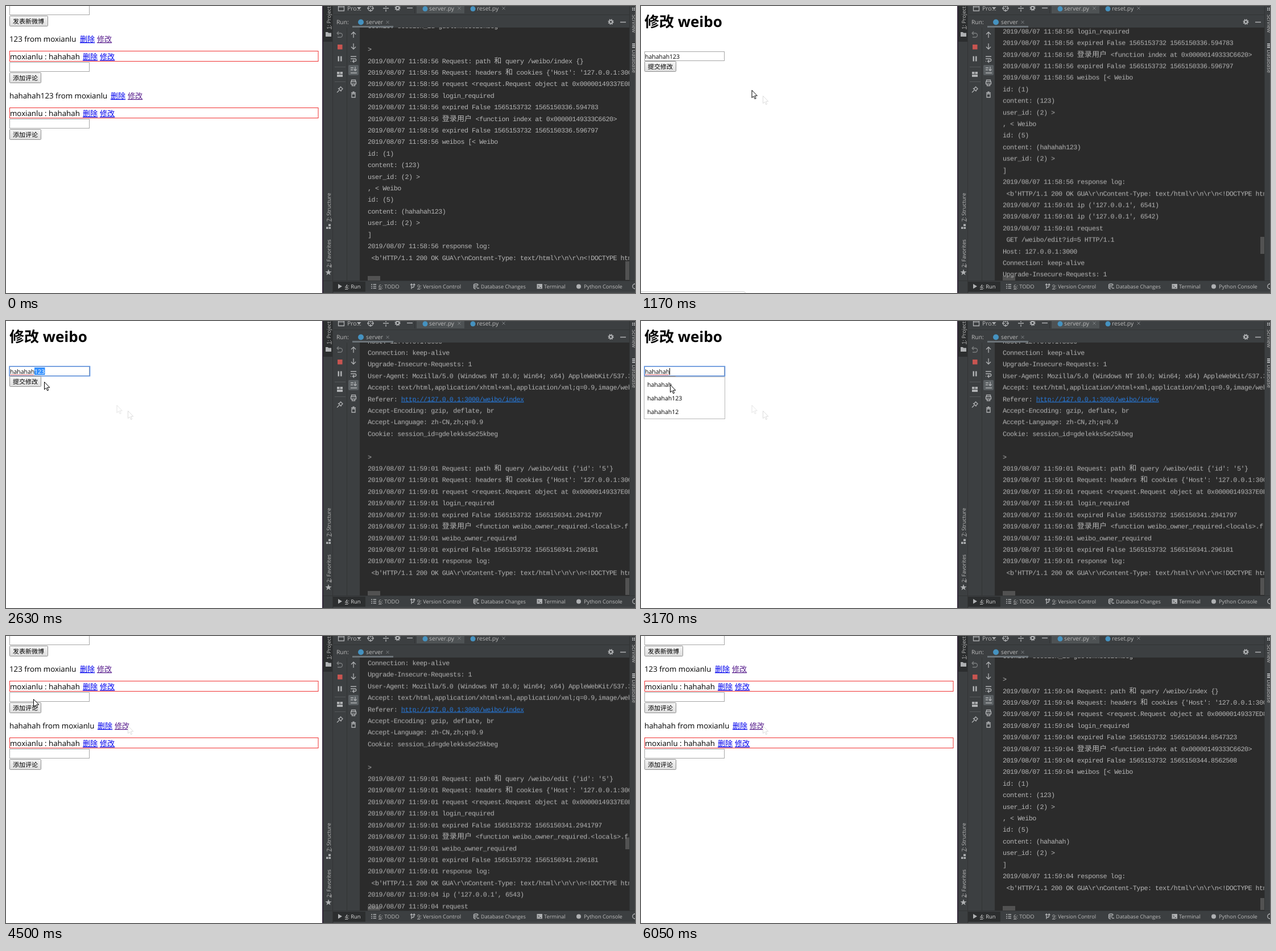
An HTML page for the animation above (6360 ms loop, 1106x506 px).

```html
<!DOCTYPE html>
<html lang="zh">
<head>
<meta charset="utf-8">
<title>修改 weibo</title>
<style>
html, body { margin: 0; width: 100%; height: 100%; overflow: hidden; background: #fff; }
svg { display: block; width: 1106px; height: 506px; }
text { white-space: pre; text-rendering: geometricPrecision; font-family: "Open Sans", "Noto Sans CJK SC", "Noto Sans CJK", sans-serif; }
.page text { font-size: 13.3px; }
.page .link { font-size: 13.1px; fill: #00e; text-decoration: underline; }
.page .seen { fill: #551a8b; }
.page .small { font-size: 10.5px; }
.page .label { font-size: 11px; }
.page .title { font-size: 26px; font-weight: 700; }
.field { fill: #fff; stroke: #a6a6a6; }
.button { fill: url(#face); stroke: #8e8e8e; }
.bar text { font-size: 9.3px; fill: #bbb; }
.bar .tab { font-size: 10.3px; }
.bar .key { text-decoration: underline; }
.icon { fill: none; stroke: #afb1b3; stroke-width: 1.3; }
.solid { fill: #afb1b3; }
.log text { font-family: "Liberation Mono", "Noto Sans CJK SC", "Noto Sans CJK", monospace; font-size: 11.7px; letter-spacing: -.476px; fill: #b6b6b6; }
.log .wide { font-size: 13.09px; letter-spacing: 0; }
.log .url { fill: #287bde; text-decoration: underline; }
.thumb { fill: #a6a6a6; fill-opacity: .32; }
</style>
</head>
<body>
<svg viewBox="0 0 1106 506">
  <defs>
    <linearGradient id="face" x2="0" y2="1"><stop stop-color="#f5f5f5"/><stop offset="1" stop-color="#dedede"/></linearGradient>
    <clipPath id="pane"><path d="M622 38H1096V484H622Z"/></clipPath>
    <path id="arrow" d="M.5 .5V13.8L3.5 11 5.7 15.8 7.7 14.9 5.6 10.2H9.8Z"/>
    <g id="gear" fill="none" stroke="#afb1b3"><circle r="2.8" stroke-width="2"/><circle r="4.3" stroke-width="1.6" stroke-dasharray="1.7 1.68"/></g>
    <path id="close" d="M-2.5 -2.5 2.5 2.5M2.5 -2.5 -2.5 2.5" stroke="#7d8184" fill="none"/>
  </defs>
  <rect width="1106" height="506" fill="#fff"/>

  <g class="page" id="list">
    <g id="forms"></g>
    <g id="before"><text x="6" y="163">hahahah123 from moxianlu</text></g>
    <g id="after"><text x="6" y="163">hahahah from moxianlu</text></g>
  </g>

  <g class="page" id="edit">
    <rect width="556" height="506" fill="#fff"/>
    <text class="title" x="6" y="36.5">修改 weibo</text>
    <rect class="field" x="6.5" y="80.5" width="140" height="16"/>
    <rect id="filled" x="6" y="80" width="141" height="17" fill="#e8f0fe"/>
    <rect id="focus" x="6" y="80" width="141.5" height="17" fill="none" stroke="#5b92e5" stroke-width="1.5"/>
    <text class="small" x="7" y="92.7">hahahah</text>
    <path id="wave" fill="none" stroke="#f33" stroke-width=".9"/>
    <text class="small" id="digits" x="50" y="92.7">123</text>
    <g id="picked">
      <rect x="50" y="82" width="18.5" height="13" fill="#3390ff"/>
      <text class="small" x="50" y="92.7" fill="#fff">123</text>
    </g>
    <path id="caret" d="M50.5 83V95" stroke="#000"/>
    <g id="submit"></g>
    <rect id="pressed" x="6.5" y="97.5" width="55" height="18" fill="#000" fill-opacity=".12" stroke="#666"/>
    <g id="hints">
      <rect x="5.5" y="98.5" width="142" height="74" fill="#fff" stroke="#b8b8b8"/>
      <rect id="hover" x="6" y="100" width="141" height="24" fill="#e8e8e8"/>
      <text class="small" x="11" y="115.5">hahahah</text>
      <text class="small" x="11" y="139.5">hahahah123</text>
      <text class="small" x="11" y="163.5">hahahah12</text>
    </g>
    <path id="bubble" d="M0 503.5H180Q183.5 503.5 183.5 506" fill="none" stroke="#d4d4d4"/>
  </g>

  <use href="#arrow" id="trailA" x="214" y="158" fill="#fff" stroke="#dcdcdc"/>
  <use href="#arrow" id="trailB" x="194.5" y="148" fill="#fff" stroke="#e4e4e4"/>

  <g class="bar">
    <rect x="556" width="550" height="506" fill="#3c3f41"/>
    <path d="M556 0H558V506H556Z" fill="#33283a"/>
    <path d="M558 0H574V63H558ZM575 486H632V504H575Z" fill="#2c2e2f"/>
    <path d="M574.5 0V506M576 15.5H1096M1096.5 0V485M558 484.5H1106M718.5 0V13M599.5 38V484" stroke="#323435" fill="none"/>
    <rect x="722" width="84" height="13" fill="#4e5254"/>
    <rect x="622" y="38" width="474" height="446" fill="#2b2b2b"/>
    <rect x="609" y="35" width="72" height="3" fill="#6c7378"/>
    <rect x="602" y="104" width="18" height="18" rx="2" fill="#5a5f62"/>
    <path d="M576 504.5H1106" stroke="#4b4e50"/>

    <text class="tab" x="600" y="7.5">Pro...</text>
    <path class="solid" d="M617 2H624.5L620.7 6.5Z"/>
    <text class="tab" x="744" y="7.5">server.py</text>
    <text class="tab" x="828" y="7.5">reset.py</text>
    <text class="tab" x="581" y="32">Run:</text>
    <text class="tab" x="633" y="32">server</text>
    <g fill="#4592c0"><circle cx="737" cy="5" r="4.5"/><circle cx="821" cy="5" r="4.5"/><circle cx="624" cy="28.500" r="5"/></g>
    <use href="#close" x="797" y="4"/><use href="#close" x="875" y="4"/><use href="#close" x="671" y="28.500"/>
    <use href="#gear" x="688.5" y="3.500"/><use href="#gear" x="1063.5" y="28"/>

    <path class="icon" d="M584.500 0V8.500H594.500V0M584 1.500H595" stroke="#8cb4cc"/>
    <path class="icon" d="M636.500 4a4.500 4.500 0 1 0 9 0a4.500 4.500 0 1 0-9 0M641 -1V2.500M641 5.500V10M635 4H639.500M642.500 4H647M663 4H673M668 -1V2M668 6V10M705 3.500H715M1080 28.500H1090"/>
    <path class="icon" d="M583 48H588A3.500 3.500 0 0 1 588 55H583M585 45 582 48 585 51" stroke-opacity=".55"/>
    <rect x="583" y="68" width="8.500" height="8.500" fill="#c75450"/>
    <path class="solid" d="M583.500 88.500h2.500v9h-2.500zM588 88.500h2.500v9h-2.500zM582 116h4.500v4h-4.500zM587.500 116h4.500v4h-4.500zM582 121h10v4h-10z"/>
    <path d="M578 107.500H597M578 133.500H597" stroke="#55585a"/>
    <path class="icon" d="M582 152.500 586 148.500M584 145 589.500 150.500M585.500 146 588.500 142.500 592 146 588.500 149.500" stroke-width="1.6"/>
    <path class="icon" d="M611 56V46M607 50 611 46 615 50M611 66V76M607 72 611 76 615 72M606 89H616M606 93H613.500A2.200 2.200 0 0 1 613.500 97.500H610M612 95 609.500 97.500 612 100M606 97.500H607M606 109H611M606 112.500H610M614 107V114M611.500 111.500 614 114 616.500 111.500M606 118H617"/>
    <path class="icon" d="M607.500 133V130.500H614.500V133M606.500 133.500H615.500V137.500H606.500ZM608.500 137V140.500H613.500V137M607 153H615M609.500 151.500H612.500M608 155V161H614V155Z" stroke-width="1.6"/>

    <text transform="translate(570.500 41)rotate(-90)"><tspan class="key">1</tspan>: Project</text>
    <text transform="translate(570.500 380)rotate(-90)"><tspan class="key">7</tspan>: Structure</text>
    <text transform="translate(570.500 461)rotate(-90)"><tspan class="key">2</tspan>: Favorites</text>
    <text transform="translate(1100.500 15)rotate(90)">SciView</text>
    <text transform="translate(1100.500 77)rotate(90)">Database</text>
    <path class="solid" d="M562 46H566L567 47.500H572V54H562ZM567 384.500h4v3.500h-4zM563 389.500h3.500v3.500h-3.500zM567.500 389.500h3.500v3.500h-3.500zM567 464 568.500 468H572.500L569.300 470.500 570.500 474.500 567 472 563.500 474.500 564.700 470.500 561.500 468H565.500ZM1101 3h2v2h-2zM1104 3h2v2h-2zM1101 6h2v2h-2zM1104 6h2v2h-2zM1101 66h5v2h-5zM1101 69h5v2h-5zM1101 72h5v2h-5z"/>

    <path class="solid" d="M584 490 591 494.300 584 498.500ZM933.500 490h9.500v8.500h-9.500z"/>
    <path class="icon" d="M642 491H644M645.500 491H651M642 494.300H644M645.500 494.300H651M642 497.500H644M645.500 497.500H651M713 490V499M713 496H715.500Q717.500 496 717.500 493V491M711 492 713 490 715 492M716 492 717.500 490 719.500 492M822.500 491.500a3.700 1.500 0 1 0 7.400 0a3.700 1.500 0 1 0-7.400 0V497Q824 499 826 498.500M822.500 494.500Q825 496.500 829 495M828 497.500H832M1106 490a4 4 0 0 0 0 8.500"/>
    <path d="M935.500 492 937.500 494 935.500 496M938.500 496.500H941" stroke="#3c3f41" fill="none"/>
    <circle class="solid" cx="1007" cy="494.500" r="4"/>
    <text x="596" y="497.800" style="fill:#ddd"><tspan class="key">4</tspan>: Run</text>
    <text x="655" y="497.800"><tspan class="key">6</tspan>: TODO</text>
    <text x="723" y="497.800"><tspan class="key">9</tspan>: Version Control</text>
    <text x="835" y="497.800" style="font-size:9.1px">Database Changes</text>
    <text x="946" y="497.800">Terminal</text>
    <text x="1016" y="497.800">Python Console</text>
  </g>

  <g class="log" clip-path="url(#pane)">
    <g id="scroll"></g>
    <g id="tail"></g>
    <rect class="thumb" x="636" y="476" width="22" height="8"/>
    <rect class="thumb" id="thumb" x="1089" width="7"/>
  </g>

  <path id="beam" d="M-3 -7H-1L0 -6 1 -7H3M0 -6V6M-3 7H-1L0 6 1 7H3" fill="none" stroke="#000"/>
  <use href="#arrow" id="cursor" fill="#fff" stroke="#000"/>
</svg>
<script>
const LOOP = 6360;
const $ = id => document.getElementById(id);

function add(parent, tag, attrs, text) {
  const node = document.createElementNS('http://www.w3.org/2000/svg', tag);
  for (const key in attrs) node.setAttribute(key, attrs[key]);
  if (text !== undefined) node.textContent = text;
  return parent.appendChild(node);
}

// Each state [time, styles] holds until the next one.
function hold(node, states) {
  const frames = states.map(([t, style]) => ({ ...style, offset: t / LOOP, easing: 'step-end' }));
  frames.push({ ...states[states.length - 1][1], offset: 1 });
  node.animate(frames, { duration: LOOP, iterations: Infinity });
}

// Toggles a hidden node at the given times.
function show(id, ...times) {
  const states = times.map((t, i) => [t, { opacity: i % 2 ? 0 : 1 }]);
  if (times[0] > 0) states.unshift([0, { opacity: 0 }]);
  hold($(id), states);
}

// Moves a node along [time, x, y]; an entry without a place hides it.
function travel(id, stops) {
  let place = 'translate(0px, 0px)';
  hold($(id), stops.map(([t, x, y]) => {
    if (x !== undefined) place = `translate(${x}px, ${y}px)`;
    return [t, { transform: place, opacity: x === undefined ? 0 : 1 }];
  }));
}

// Web page
function button(parent, y, width, label) {
  add(parent, 'rect', { class: 'button', x: 6.5, y: y + .5, width, height: 18, rx: 1 });
  add(parent, 'text', { class: 'label', x: 12, y: y + 13.7 }, label);
}
function field(parent, y) {
  add(parent, 'rect', { class: 'field', x: 6.5, y: y + .5, width: 140, height: 16 });
}
function links(parent, x, y, seen) {
  add(parent, 'text', { class: 'link', x, y }, '删除');
  add(parent, 'text', { class: seen ? 'link seen' : 'link', x: x + 30, y }, '修改');
}
const forms = $('forms');
field(forms, -1);
button(forms, 17, 67, '发表新微博');
add(forms, 'text', { x: 6, y: 63 }, '123 from moxianlu');
links(forms, 130, 63, true);
for (const y of [79, 179]) {
  add(forms, 'rect', { x: 6.5, y: y + .5, width: 542.5, height: 18, fill: 'none', stroke: '#f03030' });
  add(forms, 'text', { x: 7, y: y + 15 }, 'moxianlu : hahahah');
  links(forms, 135, y + 15);
  field(forms, y + 20);
  button(forms, y + 38, 55, '添加评论');
}
links($('before'), 184, 163, true);
links($('after'), 161, 163, true);
button($('submit'), 97, 55, '提交修改');
$('wave').setAttribute('d', 'M7 95.500' + 'l1.500 -1.500 1.500 1.500'.repeat(14));

// Console log
const ROW = 20.41, TOP = 39.3;
function print(parent, lines, first = 0) {
  lines.forEach((line, i) => {
    const row = add(parent, 'text', { x: 636, y: TOP + (first + i) * ROW });
    for (const part of line.split(/([\u4e00-\u9fff]+|http:\/\/\S+)/)) {
      const kind = /^http:/.test(part) ? 'url' : /^[\u4e00-\u9fff]/.test(part) ? 'wide' : '';
      if (part) add(row, 'tspan', { class: kind }, part);
    }
  });
}
const stamp = (time, ...lines) => lines.map(line => `2019/08/07 ${time} ${line}`);
const cookie = ['Cookie: session_id=gdelekks5e25kbeg', '', '>'];
const reply = " <b'HTTP/1.1 200 OK GUA\\r\\nContent-Type: text/html\\r\\n\\r\\n<!DOCTYPE html>";
const headers = "Request: headers 和 cookies {'Host': '127.0.0.1:3000'";

function indexLog(time, object, start, end, content) {
  return [
    ...cookie,
    ...stamp(time,
      'Request: path 和 query /weibo/index {}', headers,
      `request <request.Request object at ${object}`,
      'login_required',
      `expired False 1565153732 ${start}`,
      '登录用户 <function index at 0x00000149333C6620>',
      `expired False 1565153732 ${end}`,
      'weibos [< Weibo'),
    'id: (1)', 'content: (123)', 'user_id: (2) >',
    ', < Weibo', 'id: (5)', `content: (${content})`, 'user_id: (2) >', ']',
    ...stamp(time, 'response log:'), reply
  ];
}
const editLog = [
  ...stamp('11:59:01', "ip ('127.0.0.1', 6541)", "ip ('127.0.0.1', 6542)", 'request'),
  ' GET /weibo/edit?id=5 HTTP/1.1',
  'Host: 127.0.0.1:3000',
  'Connection: keep-alive',
  'Upgrade-Insecure-Requests: 1',
  'User-Agent: Mozilla/5.0 (Windows NT 10.0; Win64; x64) AppleWebKit/537.36',
  'Accept: text/html,application/xhtml+xml,application/xml;q=0.9,image/webp',
  'Referer: http://127.0.0.1:3000/weibo/index',
  'Accept-Encoding: gzip, deflate, br',
  'Accept-Language: zh-CN,zh;q=0.9',
  ...cookie,
  ...stamp('11:59:01',
    "Request: path 和 query /weibo/edit {'id': '5'}", headers,
    'request <request.Request object at 0x00000149337E0D',
    'login_required',
    'expired False 1565153732 1565150341.2941797',
    '登录用户 <function weibo_owner_required.<locals>.f at',
    'weibo_owner_required',
    'expired False 1565153732 1565150341.296181',
    'response log:'),
  reply
];
const scroll = $('scroll');
print(scroll, indexLog('11:58:56', '0x00000149337E0D', '1565150336.594783', '1565150336.596797', 'hahahah123'));
print(add(scroll, 'g', { id: 'editRows' }), editLog, 21);
print(add(scroll, 'g', { id: 'saveRows' }), stamp('11:59:04', "ip ('127.0.0.1', 6543)", 'request'), 46);
print($('tail'), indexLog('11:59:04', '0x00000149337ED8', '1565150344.8547323', '1565150344.8562508', 'hahahah'));

// Timeline
const OPEN = 1100, SAVED = 4500, DONE = 4580;
show('edit', OPEN, SAVED);
show('before', 0, OPEN);
show('after', SAVED);
show('bubble', OPEN, 1250);
show('trailA', 1170);
show('trailB', 1250, SAVED);
show('focus', 1640, 4180);
show('wave', 1710, SAVED);
show('digits', 0, 2020);
show('picked', 2020, 2860);
show('caret', 2860, 4180);
show('hints', 2940, 3480);
show('hover', 3250, 3480);
show('filled', 3480, SAVED);
show('pressed', 4180, 4350);
show('editRows', OPEN);
show('saveRows', SAVED);
show('tail', DONE);

const shift = y => `translate(0px, ${-y}px)`;
hold(scroll, [
  [0, { transform: shift(0), opacity: 1 }],
  [OPEN, { transform: shift(113.4), opacity: 1 }],
  [1250, { transform: shift(510.25), opacity: 1 }],
  [SAVED, { transform: shift(518.6), opacity: 1 }],
  [DONE, { transform: shift(518.6), opacity: 0 }]
]);
hold($('thumb'), [[0, 450, 33], [OPEN, 407, 30], [1250, 453, 30], [SAVED, 355, 21], [DONE, 462, 21]]
  .map(([t, y, h]) => [t, { y: y + 'px', height: h + 'px' }]));

travel('cursor', [
  [0], [70, 911, 449], [150, 850, 420], [230, 720, 365], [310, 560, 295], [390, 400, 230],
  [470, 290, 185], [560, 230, 163], [640, 214, 158],
  [1170, 194.5, 148], [1250, 176, 134], [1330, 154, 116], [1400, 136, 103], [1480],
  [2560, 60, 98], [2630, 67, 107], [3020, 62, 109], [3090, 56, 111], [3170, 51, 112], [3250, 49, 110],
  [3860, 48, 113], [4030, 48, 111],
  [5050, 50, 98], [5130, 52, 78], [5200, 53, 50], [5280, 57, 26], [5360, 78, 18],
  [5430, 130, 56], [5510, 212, 118], [5590, 290, 174], [5660, 329, 198], [5740],
  [5890, 1017, 482], [5970, 1036, 491], [6050]
]);
travel('beam', [
  [0], [1480, 104.5, 92], [1560, 82.5, 90], [1640, 70.5, 89], [1860, 64.5, 89], [1940, 58.5, 89],
  [2020, 53.5, 89], [2330, 54.5, 89], [2560]
]);
</script>
</body>
</html>
```
